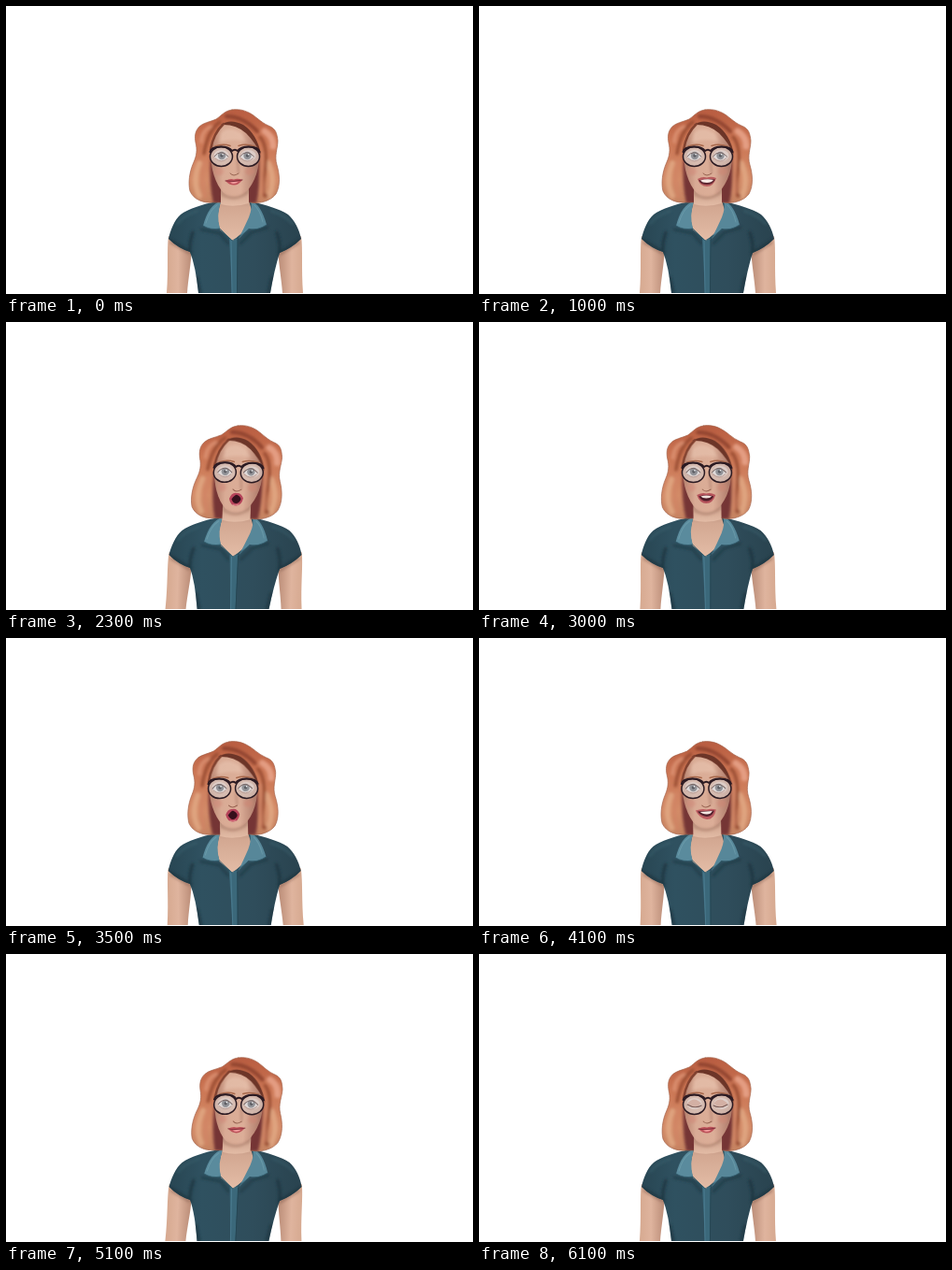
Write an HTML page that moves like this. It is 500x308 px and loops after 6200 ms.

```html
<!DOCTYPE html>
<html lang="en">
<head>
<meta charset="utf-8">
<title>Talking woman</title>
<style>
html, body { margin: 0; width: 100%; height: 100%; overflow: hidden; background: #fff; }
svg { display: block; width: 100vw; height: 100vh; }
</style>
</head>
<body>
<svg viewBox="0 0 500 308" fill="none" stroke-linecap="round" stroke-linejoin="round">
<defs>
  <linearGradient id="hair" x1="0" y1="0" x2="0" y2="1">
    <stop offset="0" stop-color="#b85c40"/><stop offset=".35" stop-color="#cb7654"/>
    <stop offset=".75" stop-color="#d38b68"/><stop offset="1" stop-color="#c48260"/>
  </linearGradient>
  <linearGradient id="face" x1="0" y1="0" x2="1" y2="0">
    <stop offset="0" stop-color="#b5806d"/><stop offset=".25" stop-color="#d9ab95"/>
    <stop offset=".62" stop-color="#dcae98"/><stop offset="1" stop-color="#a97464"/>
  </linearGradient>
  <linearGradient id="neck" x1="0" y1="0" x2="0" y2="1">
    <stop offset="0" stop-color="#a97e6c"/><stop offset=".4" stop-color="#d3a892"/><stop offset="1" stop-color="#e3bca6"/>
  </linearGradient>
  <linearGradient id="arm" x1="0" y1="0" x2="1" y2="0">
    <stop offset="0" stop-color="#d6a990"/><stop offset=".45" stop-color="#dfb49e"/><stop offset="1" stop-color="#b98b76"/>
  </linearGradient>
  <linearGradient id="shirt" x1="0" y1="0" x2="1" y2="0">
    <stop offset="0" stop-color="#284653"/><stop offset=".25" stop-color="#2f5160"/>
    <stop offset=".65" stop-color="#2f4d5b"/><stop offset="1" stop-color="#29434f"/>
  </linearGradient>
  <filter id="soft" x="-50%" y="-50%" width="200%" height="200%"><feGaussianBlur stdDeviation="1.5"/></filter>
  <filter id="fine" x="-50%" y="-50%" width="200%" height="200%"><feGaussianBlur stdDeviation=".6"/></filter>
  <clipPath id="hairClip"><path id="hairShape" d="M242 111C234 112 231 117 225 121C218 124 211 125 207 129C202 134 202 140 203 146C205 154 204 160 201 167C196 178 195 190 197 198C201 207 211 211 222 210H262C272 212 284 208 289 201C294 192 293 180 290 170C287 160 291 152 291 144C290 136 289 131 281 128C272 124 268 118 260 114C254 111 248 110 242 111Z"/></clipPath>
  <clipPath id="shirtClip"><path id="shirtShape" d="M226 209C210 212 195 217 187 223C180 229 176 240 174 249Q184 259 197 263Q203 278 206 307H283Q287 283 293 264Q306 259 316 249C314 239 309 229 302 223C293 217 278 213 263 209Z"/></clipPath>
</defs>

<g id="figure">
  <!-- arms -->
  <path id="limb" fill="url(#arm)" d="M174 246C172 260 174 281 172 307H194C195 292 198 277 199 258Z"/>
  <use href="#limb" transform="matrix(-1 0 0 1 490 0)"/>
  <g filter="url(#soft)" stroke="#865f50" stroke-width="3" opacity=".55">
    <path d="M177 253L196 264"/><path d="M313 253L294 265"/>
  </g>

  <!-- shirt -->
  <use href="#shirtShape" fill="url(#shirt)"/>
  <g clip-path="url(#shirtClip)">
    <g filter="url(#soft)">
      <path stroke="#1e3640" stroke-width="3" d="M175 250L198 264M315 250L292 265M197 260C196 252 199 246 200 242M293 262C294 252 291 246 290 242M204 290L208 307M285 290L281 307"/>
      <path stroke="#3f6674" stroke-width="2" opacity=".6" d="M183 233Q190 224 205 219M307 233Q299 224 284 219"/>
      <path stroke="#1f3a45" stroke-width="3" opacity=".7" d="M209 239L229 243L238 254M280 237L263 242L251 254"/>
    </g>
    <path fill="#3b687a" d="M239 249H248L247 307H242Z"/>
    <path stroke="#254653" d="M248 250L247.500 307"/>
    <path stroke="#4f8196" stroke-width=".8" d="M241 251L242 307"/>
  </g>

  <!-- neck and collar -->
  <path fill="url(#neck)" d="M230 192V208L226 226L229 239L243 251L257 239L264 222L260 208V192Z"/>
  <path fill="#7d5a4c" opacity=".45" filter="url(#soft)" d="M230 199Q244 211 260 198V207Q244 214 230 208Z"/>
  <path fill="#5a8b9d" d="M230 209Q217 212 211 235Q219 240 229 238Q225 224 230 209Z"/>
  <path fill="#578799" d="M262 208Q273 212 279 234Q270 240 260 238L249 249Q255 237 260 226Q264 216 262 208Z"/>
  <path stroke="#315b6b" stroke-width=".8" d="M211 235Q219 240 229 238L242 251L251 246L260 239Q270 240 279 234"/>
  <path stroke="#74a3b1" opacity=".6" d="M226 213Q218 218 214 232M266 213Q272 218 275 231"/>

  <g id="head">
    <!-- hair -->
    <use href="#hairShape" fill="url(#hair)" stroke="#a4634b" stroke-width=".7"/>
    <g clip-path="url(#hairClip)">
      <g filter="url(#soft)">
        <path fill="#743436" d="M219 160Q217 190 222 211H268Q273 190 271 155Z"/>
        <path stroke="#e3aa86" stroke-width="6" opacity=".8" d="M207 168Q199 188 207 203M281 168Q289 186 282 203"/>
        <path stroke="#e9a58b" stroke-width="7" opacity=".85" d="M277 134Q286 139 286 150"/>
        <path stroke="#dd9576" stroke-width="4" opacity=".8" d="M219 129Q210 133 209 145"/>
        <path stroke="#94482f" stroke-width="3" d="M229 124Q216 133 212 158M272 140Q281 150 277 178T279 203"/>
        <path stroke="#8f432e" stroke-width="4" d="M236 118Q254 118 269 134"/>
        <path stroke="#d18465" stroke-width="3" d="M213 166Q208 184 213 204M274 157Q274 178 274 200"/>
      </g>
    </g>
    <path fill="url(#neck)" d="M230 194V212Q244 216 260 211V194Z"/>

    <!-- face -->
    <path fill="url(#face)" d="M237 125C228 129 221 141 219 156C219 174 224 190 233 200Q244 208 256 200C267 189 272 173 271 154C267 139 252 125 237 125Z"/>
    <path fill="#e9c6b2" opacity=".55" filter="url(#soft)" d="M230 136Q239 127 253 137L257 145Q243 141 228 146Z"/>
    <g filter="url(#soft)">
      <ellipse cx="228" cy="177" rx="5" ry="4" fill="#d08b79" opacity=".6"/>
      <ellipse cx="261" cy="177" rx="5" ry="4" fill="#cd8673" opacity=".6"/>
      <path stroke="#936454" stroke-width="2" opacity=".6" d="M231 201Q244 210 258 200"/>
      <path stroke="#8f5d4e" stroke-width="2" opacity=".5" d="M248 163L249 178"/>
    </g>
    <path stroke="#efd2c1" stroke-width="2" opacity=".7" filter="url(#fine)" d="M244 160V177"/>
    <path stroke="#85503f" opacity=".8" d="M240 179Q242 181 244 181T249 179"/>
    <!-- parting -->
    <path fill="#6c3528" filter="url(#fine)" d="M230 127Q240 120 254 127Q269 137 273 159Q267 146 257 136Q246 126 230 127Z"/>
    <path stroke="#80412f" stroke-width="2.500" filter="url(#fine)" d="M233 126Q222 136 219 154"/>
    <path stroke="#a9694c" stroke-width="1.500" d="M224 150Q232 147 240 149.500M249 149.500Q257 147 266 150"/>

    <!-- eyes and glasses -->
    <g id="lens">
      <ellipse cx="230.500" cy="161" rx="12" ry="10.500" fill="#d5bfb7" opacity=".8"/>
      <ellipse cx="230.500" cy="160" rx="8" ry="6" fill="#e3d8d5" opacity=".7" filter="url(#fine)"/>
    </g>
    <use href="#lens" x="29"/>
    <g id="open">
      <g id="eye">
        <path fill="#dedada" d="M223 161Q230 151 238 161Q231 168 223 161Z"/>
        <circle cx="231" cy="160" r="4.200" fill="#929398"/>
        <circle cx="231" cy="160" r="1.700" fill="#5c5d63"/>
        <circle cx="232" cy="158.800" r=".8" fill="#fff"/>
        <path stroke="#7b6866" d="M223 161Q230 152 238 161"/>
        <path stroke="#a88a84" stroke-width=".7" d="M224 163Q231 169 237 163"/>
      </g>
      <use href="#eye" x="27.500"/>
    </g>
    <g id="shut">
      <path fill="#d3b0a4" d="M223 160Q230 151 238 160Q231 167 223 160ZM251 160Q258 151 266 160Q259 167 251 160Z"/>
      <path stroke="#795953" stroke-width="1.100" d="M223 161Q231 166 238 162M251 162Q258 166 266 161"/>
    </g>
    <g stroke="#2b1a22">
      <ellipse cx="230.500" cy="161" rx="12" ry="10.500" stroke-width="1.500"/>
      <ellipse cx="259.500" cy="161" rx="12" ry="10.500" stroke-width="1.500"/>
      <path stroke-width="2" d="M218.500 156Q220 150.500 230 150.500Q239 150.500 242 155Q245 152.500 248 155Q251 150.500 260 150.500Q270 150.500 271.500 156"/>
    </g>

    <!-- mouths -->
    <g id="c">
      <path fill="#bd525a" d="M235 187Q240 184 244 185.500Q248 184 253 186Q249 191.500 244 191.500T235 187Z"/>
      <path fill="#ef9c9c" d="M240 188.500Q245 188 249 187.700Q244 192 240 188.500Z"/>
      <path stroke="#7f2f3a" d="M235 187Q244 188.500 253 186"/>
    </g>
    <g id="e">
      <path fill="#b85c5e" d="M234 185Q239 182 244 183.500Q249 182 254 184Q251 193 244 193T234 185Z"/>
      <path fill="#5d2530" d="M235 186.500Q244 184 253 185.500Q250 191 244 191T235 186.500Z"/>
      <path fill="#f7e9e4" d="M237 186.500Q244 184.500 251 186Q249 189 244 189T237 186.500Z"/>
    </g>
    <g id="a">
      <path fill="#b4525a" d="M234 185Q240 182 244 183.500Q249 182 254 185Q251 194 244 194T234 185Z"/>
      <path fill="#4c1b27" d="M236 186.500Q244 184 252 186.500Q249 191.500 244 191.500T236 186.500Z"/>
      <path fill="#efe0db" d="M238 186.500Q244 184.500 250 186.500Q248 188.500 244 188.500T238 186.500Z"/>
    </g>
    <g id="o">
      <path fill="#b5445a" d="M236.500 189Q239 182 244 183Q249 182 251.500 188.500Q250 196.500 244 196.500T236.500 189Z"/>
      <path fill="#35101c" d="M239 189.500Q243 184 245 185Q249 187 249 190Q247 194 244 194T239 189.500Z"/>
      <path stroke="#d98088" d="M241 195.500Q244 196.500 247 195"/>
    </g>
    <g id="s">
      <path fill="#bd5c61" d="M233 184.500Q240 182 245 183.500Q250 182 255 183.500Q253 194 245 194Q237 193 233 184.500Z"/>
      <path fill="#52202c" d="M235 185.500Q244 185 253 184.500Q251 191 245 191Q239 191 235 185.500Z"/>
      <path fill="#f4e7e2" d="M238 186Q244 185.500 251 185Q249 188.500 245 188.500Q240 188.500 238 186Z"/>
    </g>
  </g>
</g>
</svg>
<script>
const LOOP = 6200, STEP = 100;
const get = id => document.getElementById(id);
const figure = get("figure"), head = get("head");
const show = (id, on) => get(id).setAttribute("display", on ? "inline" : "none");

// One mouth shape per step: closed, teeth, open, round, smile
const speech =
  "cccaeeoaae" + "eaoocaesae" + "aeooaeccea" +
  "aeesaooaec" + "esaaeooaee" + "accaeoaecc" + "cc";

// Sideways lean of the head: time, pixels
const sway = [[0, 0], [600, -1], [1000, 0], [2150, 4], [3000, -1],
  [3700, -2], [4100, -1.5], [5150, 4], [6200, 0]];

function lean(t) {
  const i = sway.findIndex(key => key[0] > t);
  const [t0, x0] = sway[i - 1], [t1, x1] = sway[i];
  const u = (t - t0) / (t1 - t0);
  return x0 + (x1 - x0) * u * u * (3 - 2 * u);
}

function draw(now) {
  const time = now % LOOP;
  const t = time < 300 ? 0 : Math.floor(time / STEP) * STEP;
  const x = lean(t), k = x / 105;
  figure.setAttribute("transform", `matrix(1 0 ${-k} 1 ${265 * k} 0)`);
  head.setAttribute("transform", `rotate(${x * 0.2} 244 180)`);

  const mouth = speech[t / STEP];
  for (const id of "ceaos") show(id, id === mouth);
  const blink = t >= 6000;
  show("open", !blink);
  show("shut", blink);
}

const start = performance.now();
function tick() {
  draw(performance.now() - start);
  requestAnimationFrame(tick);
}
tick();
</script>
</body>
</html>
```
